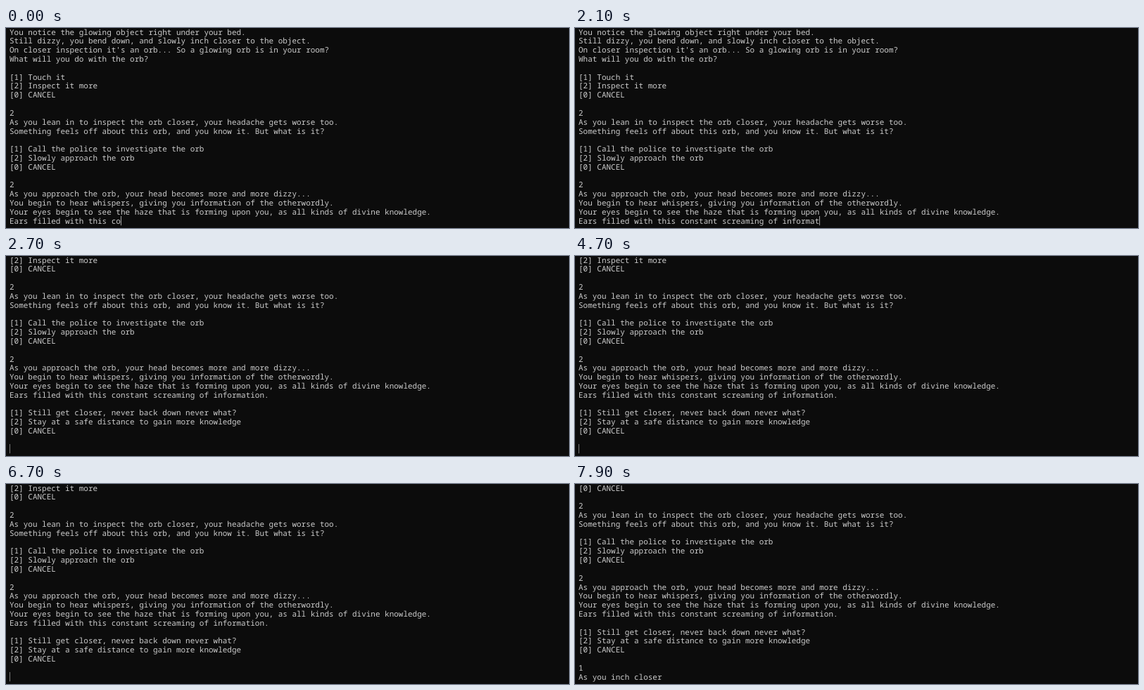
An HTML page that plays this animation: 800x285 px, repeating every 8000 ms.

```html
<!DOCTYPE html>
<html lang="en">
<head>
<meta charset="utf-8">
<title>Orb adventure</title>
<style>
  html, body { margin: 0; width: 100%; height: 100%; overflow: hidden; background: #0c0c0c; }
  svg { display: block; width: 800px; height: 285px; }
  text {
    font: 10.97px "Noto Sans Mono", "DejaVu Sans Mono", monospace;
    font-variant-ligatures: none;
    text-rendering: geometricPrecision;
    white-space: pre;
    fill: #ccc;
  }
  #caret { fill: #ccc; }
</style>
</head>
<body>
<svg id="screen" viewBox="0 0 800 285"><rect id="caret" y="268" width="0.8" height="13.3"/></svg>
<script>
const LOOP = 8000, TICK = 100;
const ROWS = 22, LEFT = 5, PITCH = 6.582, BASE = 9.5, LEAD = 12.82;

const story = `You notice the glowing object right under your bed.
Still dizzy, you bend down, and slowly inch closer to the object.
On closer inspection it's an orb... So a glowing orb is in your room?
What will you do with the orb?

[1] Touch it
[2] Inspect it more
[0] CANCEL

2
As you lean in to inspect the orb closer, your headache gets worse too.
Something feels off about this orb, and you know it. But what is it?

[1] Call the police to investigate the orb
[2] Slowly approach the orb
[0] CANCEL

2
As you approach the orb, your head becomes more and more dizzy...
You begin to hear whispers, giving you information of the otherwordly.
Your eyes begin to see the haze that is forming upon you, as all kinds of divine knowledge.
Ears filled with this constant screaming of information.

[1] Still get closer, never back down never what?
[2] Stay at a safe distance to gain more knowledge
[0] CANCEL

1
As you inch closer`.split("\n");

// Spans of time in which the caret is lit
const lit = [[0, 100], [600, 1200], [1700, 2200], [2700, 3100],
             [3600, 4100], [4700, 5200], [5800, 6300], [6700, 7400]];

const screen = document.getElementById("screen");
const caret = document.getElementById("caret");
const rows = Array.from({ length: ROWS }, (_, i) => {
  const row = document.createElementNS("http://www.w3.org/2000/svg", "text");
  row.setAttribute("x", LEFT);
  row.setAttribute("y", BASE + i * LEAD);
  return screen.appendChild(row);
});

// Bottom line of the terminal and how many of its characters are typed
function progress(t) {
  if (t < 2400) return [21, 24 + Math.floor(t / TICK * 15 / 11)];
  if (t < 2700) return [22, 0];
  if (t < 6800) return [27, 0];
  if (t < 6900) return [27, 1];
  if (t < 7500) return [28, 2 + Math.floor((t - 6900) * 11 / 600)];
  return [28, 13 + Math.floor((t - 7500) / 80)];
}

function draw(t) {
  const [line, typed] = progress(t);
  const top = line - ROWS + 1;
  rows.forEach((row, i) => {
    const full = story[top + i];
    const text = top + i === line ? full.slice(0, typed) : full;
    if (row.textContent !== text) row.textContent = text;
  });
  caret.setAttribute("x", LEFT + typed * PITCH);
  caret.style.opacity = lit.some(([a, b]) => t >= a && t < b) ? (typed ? 1 : 0.7) : 0;
}

const start = performance.now();
function frame() {
  const t = (performance.now() - start) % LOOP;
  draw(Math.floor(t / TICK) * TICK);
  requestAnimationFrame(frame);
}
frame();
</script>
</body>
</html>
```
